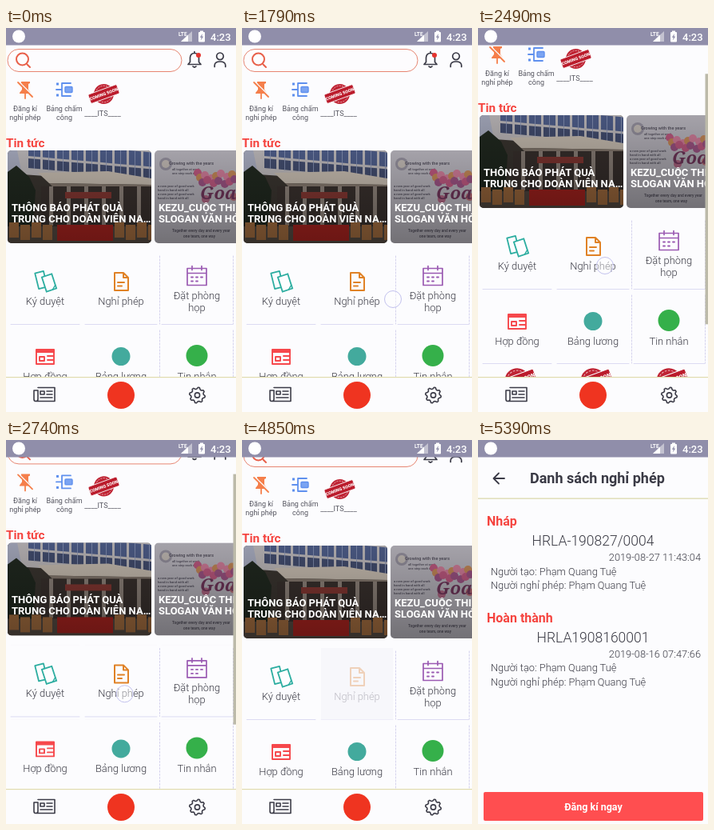
An HTML page for the animation above (8000 ms loop, 288 px wide and 480 px high).

```html
<!DOCTYPE html>
<html lang="vi">
<head>
<meta charset="utf-8">
<title>Nghỉ phép</title>
<style>
  html, body { margin: 0; width: 100%; height: 100%; overflow: hidden; background: #fcfcfe; }
  svg { display: block; width: 100vw; height: 100vh; }
  text { font-family: Roboto, "Open Sans", sans-serif; white-space: pre; }
  .line { fill: none; stroke-linecap: round; stroke-linejoin: round; }
</style>
</head>
<body>
<svg id="stage" viewBox="0 0 288 480" xmlns="http://www.w3.org/2000/svg"></svg>
<script>
const LOOP = 8000;
const RED = '#f5443f', INK = '#3b3b47', BODY = '#3a3a44';
const stage = document.getElementById('stage');

const text = (x, y, str, size, { fill = BODY, weight = 300, anchor = 'start' } = {}) =>
  `<text x="${x}" y="${y}" font-size="${size}" font-weight="${weight}" fill="${fill}" text-anchor="${anchor}">${str}</text>`;
const mid = (x, y, str, size, opt = {}) => text(x, y, str, size, { ...opt, anchor: 'middle' });
const rect = (x, y, w, h, fill, r = 0, extra = '') =>
  `<rect x="${x}" y="${y}" width="${w}" height="${h}" rx="${r}" fill="${fill}" ${extra}/>`;
const disc = (x, y, r, fill) => `<circle cx="${x}" cy="${y}" r="${r}" fill="${fill}"/>`;
const poly = (points, fill) => `<polygon points="${points}" fill="${fill}"/>`;
const line = (d, color, width = 1.6, extra = '') =>
  `<path class="line" d="${d}" stroke="${color}" stroke-width="${width}" ${extra}/>`;
const at = (x, y, body, rot = 0, scale = 1) =>
  `<g transform="translate(${x} ${y}) rotate(${rot}) scale(${scale})">${body}</g>`;
const repeat = (n, fn) => Array.from({ length: n }, (_, i) => fn(i)).join('');

// Icons are drawn around their own centre.
const icon = {
  search: line('M5.7 5.7L9 9M7-1A7.5 7.5 0 1 1-8-1A7.5 7.5 0 1 1 7-1', '#e8604a', 2),
  bell: line('M-8 6.5H8L5.5 3.5V-2Q5-7.5 0-7.5Q-5-7.5-5.5-2V3.5ZM-2 9Q0 11 2 9M0-7.5V-9.5', INK, 1.7) +
    disc(5, -5, 3, '#e5342f'),
  person: line('M4.3-4.2A4.3 4.3 0 1 1-4.3-4.2A4.3 4.3 0 1 1 4.3-4.2M-6.8 9V7Q-6.5 2.5 0 2.5Q6.5 2.5 6.8 7V9', INK, 1.7),
  pinOff: poly('-5,-10 6,-10 6,-8 4,-7 4,0 7,4 7,5 -7,5 -7,4 -4,0 -4,-7 -5,-8', '#f57f4b') +
    line('M0 4V11', '#f57f4b', 1.8) + line('M-8-9.5L10 8', '#fcfcfe', 2) + line('M-9-9L9 9', '#f57f4b', 1.8),
  flow: line('M8-8H-3V8H8M-10 0H-3', '#5f90ee', 1.8) + rect(1, -3.5, 9, 7, '#7ba4f2', 1, 'stroke="#5f90ee" stroke-width="1.4"') +
    rect(-10, -8.5, 3, 3, '#5f90ee') + rect(-10, 5.5, 3, 3, '#5f90ee'),
  stamp: disc(0, 0, 12.5, '#bf2434') +
    `<circle r="10.3" fill="none" stroke="#edb9c0" stroke-width=".8" stroke-dasharray="2 1.4"/>` +
    rect(-19, -6, 38, 12, '#bb1c2c', 1.5, 'stroke="#fcfcfe" stroke-width=".8"') +
    mid(0, 2, 'COMING SOON', 5.4, { fill: '#fff', weight: 900 }),
  sheets: at(-5, -2, line('M-5.5-10H5.5V10H-5.5Z', '#2cada0', 1.8), -14) +
    at(5, 1.5, rect(-6.5, -9.5, 13, 19, '#fdfdff', 0, 'stroke="#2cada0" stroke-width="1.8"') +
      line('M1.5 9.5L6.5 5', '#2cada0', 1.4), -18),
  file: line('M-8-11H3L9-5V11H-8ZM3-11V-5H9M-4 1H4M-4 5.5H1', '#e08226', 2),
  calendar: line('M-12-9H12V12H-12ZM-12-3H12M-6-12V-7M6-12V-7', '#9a5ab2', 1.7) +
    line('M-7 2H-5M-1 2H1M5 2H7M-7 7H-5M-1 7H1', '#9a5ab2', 1.8),
  contract: rect(-12, -10, 24, 5, '#f6484c', 1) +
    line('M-11-8V9H11V-8M-7 0H-1V5H-7ZM3-1H11M3 4H11', '#f6484c', 1.9),
  news: line('M-8-8.5H13V8.5H-11Q-13 8.5-13 6V-5H-8V6Q-8 8.5-10.5 8.5M3-4H10M3 0H10M-5 4H10', INK, 1.6) +
    line('M-5-4H0V0H-5Z', INK, 1.6),
  gear: line('M' + repeat(32, i => {
    const a = (i + 0.5) / 32 * Math.PI * 2, r = i % 4 < 2 ? 9.8 : 7.8;
    return (i ? 'L' : '') + (r * Math.cos(a)).toFixed(1) + ' ' + (r * Math.sin(a)).toFixed(1);
  }) + 'Z', INK, 1.6) + `<circle r="3.1" fill="none" stroke="${INK}" stroke-width="1.6"/>`,
};

function building() {
  let s = rect(2, 153, 180, 116, '#39342f') + poly('2,153 60,153 45,182 2,184', '#a3a7ba');
  s += poly('14,153 182,153 182,194 20,183', '#b7b3b5');
  // Glass bands run slightly downhill.
  s += `<g transform="translate(28 150) skewY(5)">` +
    repeat(9, i => rect(i * 18, -8, 15, 18, '#4c5b86') + rect(i * 18, 13, 15, 12, '#414b6c') +
      line(`M${i * 18 + 7.5}-8V25`, '#8792b2', 0.8)) + '</g>';
  s += poly('40,181 128,179 182,188 182,196 54,194', '#c3b9ad') + poly('54,194 182,196 182,200 58,198', '#82766c');
  s += rect(44, 198, 138, 50, '#38302d') + repeat(6, i => rect(54 + i * 22, 198, 5, 49, '#8b8078'));
  s += rect(74, 205, 58, 8, '#813631');
  s += poly('2,180 13,172 29,186 37,203 34,250 2,253', '#20281f');
  s += rect(2, 248, 180, 21, '#534941') + rect(64, 246, 70, 20, '#a7231f');
  s += repeat(8, i => rect(i < 4 ? 4 + i * 14 : 80 + i * 14, 243 + i % 2 * 3, 12, 19, '#a16c3f'));
  return s + rect(2, 153, 180, 116, 'url(#shade)');
}

function poster() {
  const tiny = { fill: '#4c4956', weight: 500 };
  let s = rect(186, 153, 110, 116, '#b3b0b8');
  s += disc(200, 170, 8, '#8f8b98') + disc(200, 170, 5, '#bab3ae');
  s += text(204, 171, 'Growing with the years', 5.5, tiny);
  s += text(208, 178, 'all together at work', 4, tiny) + text(208, 183, 'one step each day', 4, tiny);
  const petals = ['#b8567c', '#ca7894', '#97507f', '#be8455'];
  s += repeat(15, i => disc(240 + i * 17 % 48, 181 + i * 7 % 15, 5, petals[i % 4]));
  s += disc(250, 214, 5, '#a9627e') + disc(285, 211, 5, '#b36b73');
  s += `<text x="243" y="214" font-size="22" font-style="italic" font-weight="700" fill="#6d3458" style="font-family:'Noto Serif',serif">Goal</text>`;
  s += repeat(4, i => text(190, 199 + i * 5, i % 2 ? 'hand in hand with all' : 'a new year of good work', 4.2, tiny));
  s += text(208, 255, 'Together every day and every year', 4.8, tiny) + text(222, 262, 'one team, one way', 4.8, tiny);
  return s + rect(186, 153, 110, 116, 'url(#shade)');
}

const COLS = [[6, 86, 49], [99, 90, 144], [195, 89, 239]];
function card(col, row, body, id = '') {
  const [x, w] = COLS[col], y = 281 + row * 93;
  return rect(x, y, w, 90, '#f6f5fb') + `<g ${id && `id="${id}"`}>` + rect(x, y, w, 90, '#fcfcfe') +
    line(`M${x} ${y + 89.5}H${x + w}`, '#dcdbf2', 1) + body + '</g>';
}

function home() {
  const bold = { fill: '#fff', weight: 700 };
  const label = (x, y, s) => mid(x, y, s, 12.9);
  const small = (x, y, s) => mid(x, y, s, 9, { weight: 400, fill: '#55555f' });
  let s = rect(2, 26.5, 218, 28, '#fdfcfe', 14, 'stroke="#e78672" stroke-width="1"');
  s += at(21, 40, icon.search) + at(236, 39, icon.bell) + at(268, 39.5, icon.person);
  s += at(24, 77, icon.pinOff) + at(73, 77, icon.flow) + at(122.5, 82.5, icon.stamp, -20);
  s += small(24, 104, 'Đăng kí') + small(24, 115, 'nghỉ phép');
  s += small(73, 104, 'Bảng chấm') + small(73, 115, 'công') + small(121, 109.5, '____ITS____');
  s += text(0, 148.5, 'Tin tức', 15.3, { fill: RED, weight: 700 });
  s += `<g clip-path="url(#slide1)">${building()}</g><g clip-path="url(#slide2)">${poster()}</g>`;
  s += text(7, 229, 'THÔNG BÁO PHÁT QUÀ', 13, bold) + text(7, 243, 'TRUNG CHO DOÀN VIÊN NA…', 13, bold);
  s += text(191, 229, 'KEZU_CUỘC THI', 13, bold) + text(191, 243, 'SLOGAN VĂN HÓA', 13, bold);
  s += card(0, 0, at(49, 317, icon.sheets) + label(49, 346, 'Ký duyệt'));
  s += card(1, 0, at(144, 317, icon.file) + label(144, 346, 'Nghỉ phép'), 'leave');
  s += card(2, 0, at(239, 309.5, icon.calendar) + label(239, 339, 'Đặt phòng') + label(239, 353.5, 'họp'));
  s += card(0, 1, at(49, 411, icon.contract) + label(49, 439.5, 'Hợp đồng'));
  s += card(1, 1, disc(144, 410.5, 11.5, '#43aa9d') + label(144, 439.5, 'Bảng lương'));
  s += card(2, 1, disc(239, 409.5, 13.5, '#35b04a') + label(239, 439.5, 'Tin nhắn'));
  COLS.forEach(c => s += at(c[2], 485, icon.stamp, -20, 1.25));
  for (const y of [285, 378])
    s += line(`M192.5 ${y}V${y + 85}M284.5 ${y}V${y + 85}`, '#d5d3ee', 1, 'stroke-dasharray="2 2"');
  return s;
}

function entry(y, group, code, stamp) {
  const who = 'Phạm Quang Tuệ';
  return text(11, y, group, 16, { fill: RED, weight: 700 }) + mid(144, y + 25, code, 17.5) +
    text(279, y + 44, stamp, 12.8, { anchor: 'end' }) +
    text(16, y + 61.5, 'Người tạo: ' + who, 12.8) + text(16, y + 79, 'Người nghỉ phép: ' + who, 12.8);
}

function list() {
  return rect(0, 0, 288, 540, '#fcfcfe') + line('M33 48H20M26 41.5L19.5 48L26 54.5', INK, 1.8) +
    text(65, 54, 'Danh sách nghỉ phép', 18, { fill: '#3a3a45', weight: 700 }) +
    rect(0, 72.5, 288, 1.3, '#dcd9ad') +
    entry(107, 'Nháp', 'HRLA-190827/0004', '2019-08-27 11:43:04') +
    entry(227.5, 'Hoàn thành', 'HRLA1908160001', '2019-08-16 07:47:66') +
    rect(7, 440, 275, 36, '#ff4e50', 2) + mid(144.5, 463, 'Đăng kí ngay', 12.5, { fill: '#fff', weight: 700 });
}

const statusBar = rect(0, 0, 288, 21.5, '#908eaa') + disc(16, 10.5, 8, '#fff') +
  text(216, 9.5, 'LTE', 6.5, { fill: '#fff', weight: 700 }) +
  poly('219,17 233,17 233,4', '#c3c2d0') + poly('219,17 228,17 228,8.6', '#fff') +
  rect(241, 5, 8, 12.5, '#fff', 1) + rect(243, 3.5, 4, 2, '#fff') +
  poly('246,7 242.8,11.8 244.7,11.8 244,15.5 247.2,10.6 245.3,10.6', '#908eaa') +
  text(256, 15.5, '4:23', 13, { fill: '#fff', weight: 500 });

stage.innerHTML = `<defs>
  <linearGradient id="shade" x2="0" y2="1"><stop offset="0" stop-opacity=".08"/><stop offset="1" stop-opacity=".36"/></linearGradient>
  <clipPath id="slide1">${rect(2, 153, 180, 116, '#000', 5)}</clipPath>
  <clipPath id="slide2">${rect(186, 153, 110, 116, '#000', 5)}</clipPath></defs>
  ${rect(0, 0, 288, 480, '#fcfcfe')}
  <g id="page">${home()}</g>
  ${rect(284.5, 0, 3.5, 313, '#bcbaa9', 0, 'id="bar"')}
  ${rect(0, 436, 288, 44, '#fcfcfe')}${rect(0, 436, 288, 1.2, '#e0dcae')}
  ${at(48, 458, icon.news)}${disc(144, 459, 17, '#ef3420')}${at(239.5, 459, icon.gear)}
  <circle id="touch" r="10.5" fill="#fff" fill-opacity=".45" stroke="#c3c2ee"/>
  <g id="list">${list()}</g>${statusBar}`;

const [page, bar, touch, leave, listView] =
  ['page', 'bar', 'touch', 'leave', 'list'].map(id => document.getElementById(id));

const ramp = (t, a, b) => Math.min(1, Math.max(0, (t - a) / (b - a)));

// Linear track through [time, value] keys.
function track(t, keys) {
  let v = keys[0][1];
  for (let i = 1; i < keys.length; i++)
    v += (keys[i][1] - keys[i - 1][1]) * ramp(t, keys[i - 1][0], keys[i][0]);
  return v;
}

function draw(t) {
  const scroll = track(t, [[1980, 0], [2200, 16], [2490, 44], [2530, 44], [2780, 21]]);
  page.setAttribute('transform', `translate(0 ${-scroll})`);
  bar.setAttribute('y', 24 + scroll * 0.757);
  bar.setAttribute('opacity', t < 1980 ? 0 : 1 - ramp(t, 3190, 3440));

  const tapping = t >= 3900 && t < 4350;
  const dragging = t >= 1750 && t < 2950;
  touch.setAttribute('visibility', tapping || dragging ? 'visible' : 'hidden');
  touch.setAttribute('cx', tapping ? 145.5 : track(t, [[1900, 189], [2200, 182], [2490, 159], [2780, 147]]));
  touch.setAttribute('cy', tapping ? 295.5 : track(t, [[1900, 339], [2200, 321], [2490, 297], [2530, 297], [2780, 321]]));

  leave.setAttribute('opacity', 1 - 0.7 * ramp(t, 4310, 4520));

  const open = 1 - (1 - ramp(t, 4870, 5390)) ** 3;
  listView.setAttribute('opacity', open);
  listView.setAttribute('transform', `translate(0 ${50 * (1 - open)})`);
}

function tick() {
  draw(performance.now() % LOOP);
  requestAnimationFrame(tick);
}
tick();
</script>
</body>
</html>
```
